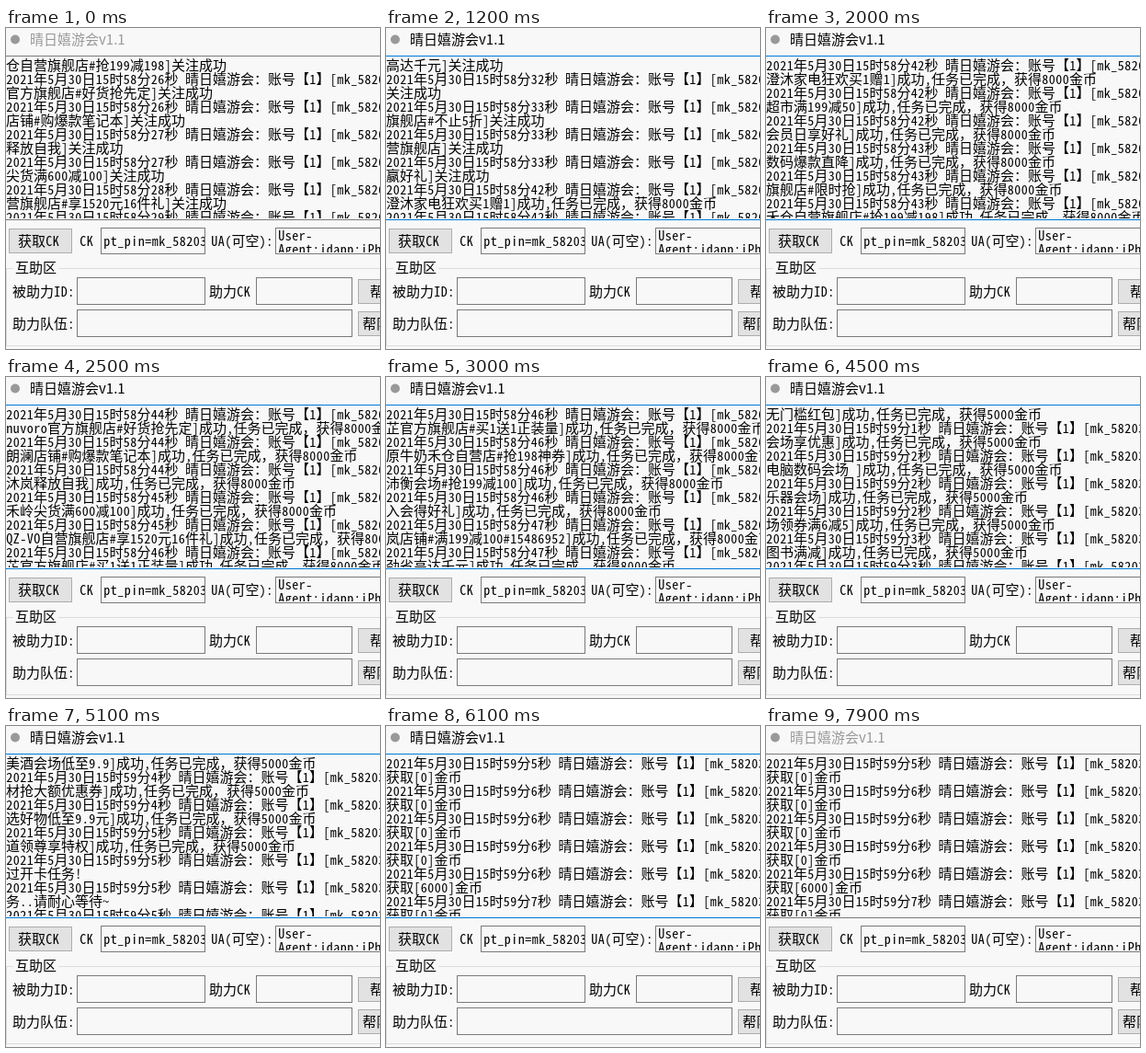
Recreate the animation shown at these times as an HTML page with a canvas. Size 407 px wide and 349 px high, loop 8000 ms.

```html
<!DOCTYPE html>
<html lang="zh-CN">
<head>
<meta charset="utf-8">
<title>晴日嬉游会v1.1</title>
<style>
html, body { margin: 0; width: 100%; height: 100%; overflow: hidden; background: #f8f8f8; }
canvas { display: block; }
</style>
</head>
<body>
<canvas id="stage" width="407" height="349"></canvas>
<script>
const ctx = document.getElementById('stage').getContext('2d');
const W = 407, H = 349, LOOP = 8000;
const EM = 15, HALF = EM / 2, ROW = 15;
const CJK = '"Noto Sans CJK SC", "Noto Sans CJK", sans-serif';
const WIDE_FONT = `15px ${CJK}`;
const NARROW_FONT = '14px "Noto Sans Mono CJK SC", "Liberation Mono", monospace';
const APP = '晴日嬉游会', USER = 'mk_58203';
const FORM = '#f8f8f8', EDGE = '#7a7a7a';

// Each entry: "minute:second wrapped text"; the suffix depends on the phase.
const phases = [
  [']关注成功', `58:25 仓自营旗舰店#抢199减198
58:26 官方旗舰店#好货抢先定
58:26 店铺#购爆款笔记本
58:27 释放自我
58:27 尖货满600减100
58:28 营旗舰店#享1520元16件礼
58:29 旗舰店#买1送1正装量
58:29 自营店#抢198神券
58:30 会场#抢199减100
58:30 得好礼
58:31 铺#满199减100#15486952
58:31 高达千元`],
  ['', `58:32 关注成功`],
  [']关注成功', `58:33 旗舰店#不止5折
58:33 营旗舰店
58:33 赢好礼`],
  [']成功,任务已完成，获得8000金币', `58:42 澄沐家电狂欢买1赠1
58:42 超市满199减50
58:42 会员日享好礼
58:43 数码爆款直降
58:43 旗舰店#限时抢
58:43 禾仓自营旗舰店#抢199减198
58:44 nuvoro官方旗舰店#好货抢先定
58:44 朗澜店铺#购爆款笔记本
58:44 沐岚释放自我
58:45 禾岭尖货满600减100
58:45 QZ-VO自营旗舰店#享1520元16件礼
58:46 芷官方旗舰店#买1送1正装量
58:46 原牛奶禾仓自营店#抢198神券
58:46 沛衡会场#抢199减100
58:46 入会得好礼
58:47 岚店铺#满199减100#15486952
58:47 劲省高达千元
58:47 神价
58:48 官方旗舰店#不止5折
58:48 仓自营旗舰店
58:48 天才赢好礼`],
  [']成功,任务已完成，获得5000金币', `59:1 无门槛红包
59:1 会场享优惠
59:2 电脑数码会场 
59:2 乐器会场
59:2 场领券满6减5
59:3 图书满减
59:3 家装好物
59:3 美酒会场低至9.9
59:4 材抢大额优惠券
59:4 选好物低至9.9元
59:5 道领尊享特权`],
  ['', `59:5 过开卡任务!
59:5 务..请耐心等待~
59:5 获取[0]金币
59:6 获取[0]金币
59:6 获取[0]金币
59:6 获取[0]金币
59:6 获取[6000]金币
59:7 获取[0]金币`]
];

const lines = phases.flatMap(([suffix, list]) => list.split('\n').flatMap(entry => {
  const [, minute, second, text] = entry.match(/^(\d+):(\d+) (.*)$/);
  return [`2021年5月30日15时${minute}分${second}秒 ${APP}：账号【1】[${USER}]`, text + suffix];
})).slice(1);

// [time in ms, first visible line]
const scrolls = [
  [0, 0], [1000, 11], [1200, 22], [1500, 25], [1800, 28], [2000, 31], [2100, 36],
  [2200, 39], [2500, 43], [2600, 46], [2700, 49], [3000, 53], [3100, 56], [3300, 61],
  [3400, 66], [3700, 71], [4500, 74], [4800, 78], [5000, 83], [5100, 88], [5800, 92], [6100, 99]
];
const borders = [[0, EDGE], [100, '#171717'], [400, EDGE], [800, '#0078d7'], [7900, EDGE]];
const titleColors = [[0, '#999'], [800, '#000'], [7900, '#999']];

const valueAt = (steps, t) => steps.filter(([time]) => time <= t).pop()[1];

function fill(x, y, w, h, color) {
  ctx.fillStyle = color;
  ctx.fillRect(x, y, w, h);
}

function box(x, y, w, h, color, edge) {
  fill(x, y, w, h, edge);
  fill(x + 1, y + 1, w - 2, h - 2, color);
}

function clipped(x, y, w, h, draw) {
  ctx.save();
  ctx.beginPath();
  ctx.rect(x, y, w, h);
  ctx.clip();
  draw();
  ctx.restore();
}

// Console style text: full-width characters take two cells.
function cells(text, x, y) {
  ctx.fillStyle = '#000';
  for (const ch of text) {
    if (x > W) break;
    const wide = ch.charCodeAt(0) > 255;
    ctx.font = wide ? WIDE_FONT : NARROW_FONT;
    ctx.textAlign = wide ? 'left' : 'center';
    ctx.fillText(ch, wide ? x : x + HALF / 2, y);
    x += wide ? EM : HALF;
  }
}

const field = (x, y, w, h) => box(x, y, w, h, FORM, EDGE);

function button(label, x, y, w, h, textX) {
  box(x, y, w, h, '#e2e2e2', '#adadad');
  cells(label, textX, y + h / 2 + 5.5);
}

function drawTitle(t) {
  ctx.fillStyle = '#999';
  ctx.beginPath();
  ctx.arc(10, 12.5, 5, 0, Math.PI * 2);
  ctx.fill();
  ctx.font = `15px ${CJK}`;
  ctx.textAlign = 'left';
  ctx.fillStyle = valueAt(titleColors, t);
  ctx.fillText(APP + 'v1.1', 26, 18);
}

function drawLog(t) {
  const top = valueAt(scrolls, t);
  box(-1, 30, W + 2, 179, FORM, valueAt(borders, t));
  clipped(0, 32, W, 175, () =>
    lines.slice(top, top + 12).forEach((line, i) => cells(line, 0, 46 + i * ROW)));
}

function drawForm() {
  button('获取CK', 3, 218, 69, 27, 13);
  cells('CK', 80, 237);
  field(103, 217, 114, 29);
  clipped(104, 218, 112, 27, () => cells('pt_pin=' + USER, 106, 237));
  cells('UA(可空):', 223, 237);
  field(293, 217, 130, 29);
  clipped(294, 218, W, 26, () => {
    cells('User-', 296, 231);
    cells('Agent:jdapp;iPhone', 296, 246);
  });

  ctx.strokeStyle = '#dcdcdc';
  ctx.lineWidth = 1;
  ctx.strokeRect(0.5, 261.5, W + 10, 84);
  fill(8, 255, 49, 14, FORM);
  cells('互助区', 10, 266);

  cells('被助力ID:', 7, 292);
  field(77, 271, 140, 30);
  cells('助力CK', 221, 292);
  field(272, 271, 105, 30);
  button('帮助', 383, 273, 60, 27, 396);
  cells('助力队伍:', 7, 327);
  field(77, 306, 300, 30);
  button('帮队伍', 383, 308, 60, 27, 388);
}

function frame() {
  const t = performance.now() % LOOP;
  fill(0, 0, W, H, FORM);
  drawTitle(t);
  drawLog(t);
  drawForm();
  requestAnimationFrame(frame);
}
frame();
</script>
</body>
</html>
```
